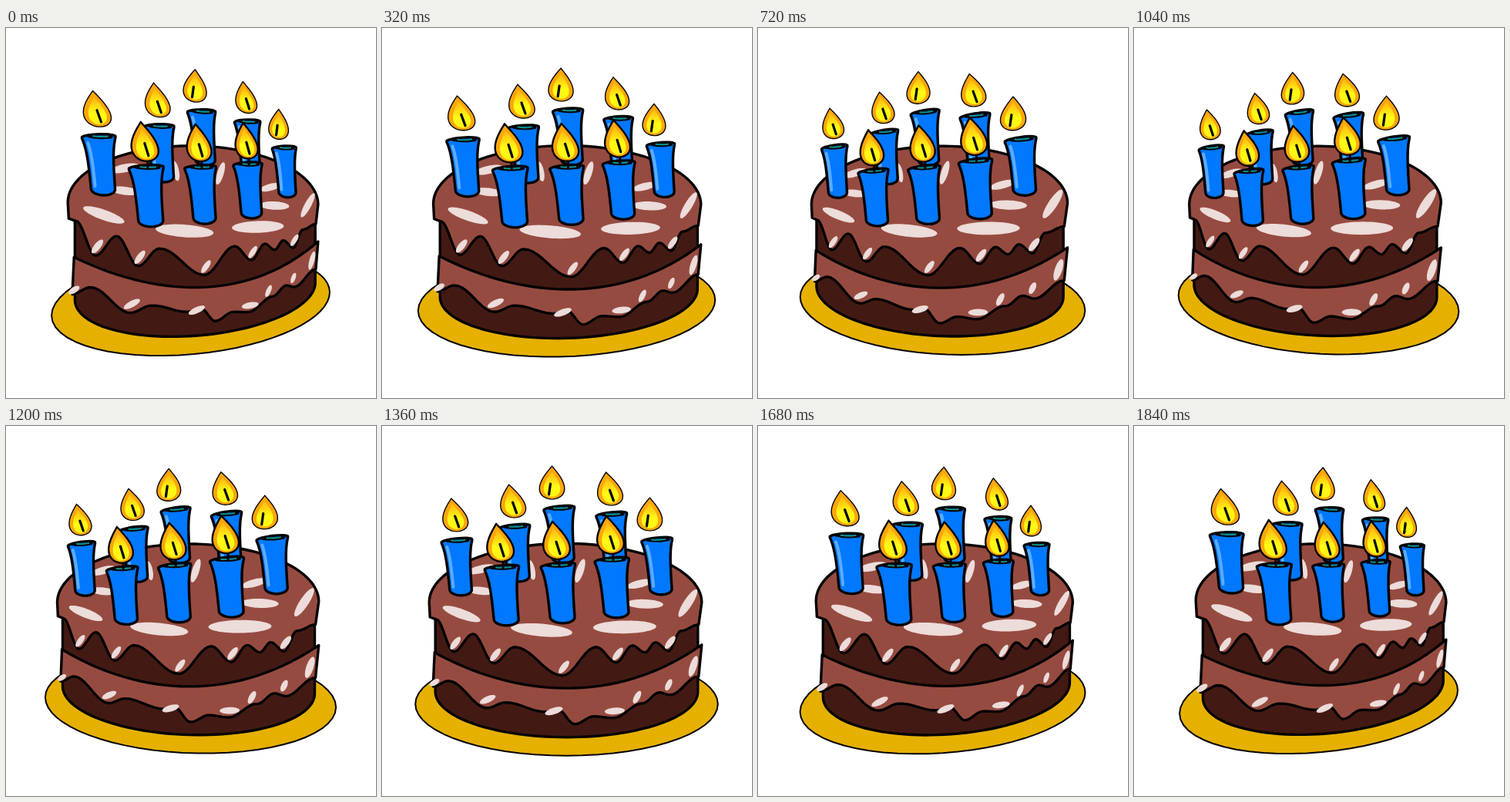
Animation, 480 px wide and 480 px high, one loop 1.92 s. Source, as an HTML page with a canvas:

```html
<!DOCTYPE html>
<html lang="en">
<head>
<meta charset="utf-8">
<title>Birthday cake</title>
<style>
html, body { margin: 0; width: 100%; height: 100%; overflow: hidden; background: #fff; }
canvas { display: block; width: 480px; height: 480px; }
</style>
</head>
<body>
<canvas id="cake" width="480" height="480"></canvas>
<script>
const ctx = document.getElementById('cake').getContext('2d');
const STEP = 80, STEPS = 24, MID = 240;
const INK = '#050202', ICING = '#964b40', SPONGE = '#431a13', SHINE = '#ecdcda';
const BLUE = '#0078ff', GLOW = '#5aacff', TEAL = '#0a9292', GOLD = '#e6b000';
const { PI, cos, sin, sqrt, exp, abs, max } = Math;

// The cake swings to and fro in perspective, kept centred on the stage.
const view = {};
function swing(now) {
  const k = Math.floor(now / STEP) % STEPS;
  const p = cos(2 * PI * (k + .5) / STEPS), m = abs(p);
  const half = 197.8 - 11 * m - 6.7 * p * p;
  view.turn = .00058 * (p + .1305);
  view.sx = half / 196.5;
  view.sy = 1.004 - .034 * m;
  view.dx = half * 196.5 * view.turn;
  view.dy = -1.5 * m;
}

function project([x, y]) {
  const q = 1 + view.turn * (x - MID);
  return [MID + (view.sx * (x - MID) + view.dx) / q, MID + (view.sy * (y - MID) + view.dy) / q];
}

// Points of f(t) for t from 0 to 1.
const sample = (f, n = 32) => Array.from({ length: n + 1 }, (_, i) => f(i / n));

const arc = (x, y, rx, ry, from = 0, to = 2 * PI) => sample(t => {
  const a = from + (to - from) * t;
  return [x + rx * cos(a), y + ry * sin(a)];
}, 60);

// Runny edge: eases between alternating tips and notches.
const runny = keys => keys.slice(1).flatMap(([x1, y1], i) => {
  const [x0, y0] = keys[i];
  return sample(t => [x0 + (x1 - x0) * t, y0 + (y1 - y0) * (1 - cos(PI * t)) / 2], 10);
});

function trace(pts) {
  ctx.beginPath();
  pts.forEach(p => ctx.lineTo(...project(p)));
}

function line(pts, color, width) {
  trace(pts);
  ctx.strokeStyle = color;
  ctx.lineWidth = width;
  ctx.stroke();
}

function blob(pts, fill, width = 3.4) {
  trace(pts);
  ctx.closePath();
  ctx.fillStyle = fill;
  ctx.fill();
  if (!width) return;
  ctx.strokeStyle = INK;
  ctx.lineWidth = width;
  ctx.stroke();
}

function shine([x, y, r, deg]) {
  const a = deg * PI / 180, thin = 2.5 + r / 7;
  blob(arc(0, 0, r, thin).map(([u, v]) =>
    [x + u * cos(a) - v * sin(a), y + u * sin(a) + v * cos(a)]), SHINE, 0);
}

const topDrips = [[70, 251], [93, 293], [118, 270], [145, 308], [172, 287], [234, 324], [278, 287],
  [304, 307], [325, 285], [341, 294], [355, 281], [372, 292], [388, 266], [411, 258]];
const lowDrips = [[66, 338], [86, 331], [136, 366], [160, 359], [212, 371], [228, 368], [250, 387],
  [275, 377], [300, 379], [338, 360], [360, 346], [374, 349], [411, 325]];
const topShines = [[103, 244, 26, 20], [207, 265, 40, 5], [315, 261, 41, -1], [341, 231, 24, 2],
  [334, 205, 17, -14], [397, 230, 21, -57], [257, 188, 16, -72], [128, 186, 18, -14],
  [128, 214, 18, 6], [194, 187, 13, 78]];
const lowShines = [[68, 333, 7, -32], [137, 355, 11, -24], [223, 370, 12, -18], [302, 370, 13, -4],
  [331, 352, 9, -62], [372, 336, 8, -65], [404, 312, 14, -72]];

function drawCake() {
  blob(arc(239.5, 361, 196.5, 67), GOLD, 2);
  blob([[69, 235], ...arc(239.5, 345, 170.5, 59, PI, 0), [410, 235]], SPONGE);

  const seam = sample(t => {
    const s = 1 - t, mix = (a, b, c, d) => a * s ** 3 + 3 * b * s * s * t + 3 * c * s * t * t + d * t ** 3;
    return [mix(68, 170, 300, 415), mix(294, 350, 365, 284)];
  });
  blob([...seam, ...runny(lowDrips).reverse()], ICING);
  lowShines.forEach(shine);

  blob([...arc(238, 229, 177, 76.5, PI, 2 * PI), ...runny(topDrips).reverse(), [62, 248]], ICING);
  topShines.forEach(shine);
  topDrips.forEach(([x, y], i) => {
    if (i && y - topDrips[i - 1][1] > 10) shine([x + 2, y - 11, 10, -52]);
  });
}

// Edge of a wax stick at depth t: side is -1 for left, 1 for right.
function waxEdge(x, y, w, h, t, side) {
  const half = .33 + .17 * exp(-4.4 * t);
  const round = sqrt(1 - max(0, (t - .9) / .1, 1 - t / .05) ** 2);
  const off = side * half * round;
  return [x + w * (.5 + .14 * t + off), y + h * (t - .06 * off * (1 - t))];
}

function drawCandle(x, y, w, h, lit) {
  const edge = side => sample(t => waxEdge(x, y, w, h, (1 - cos(PI * t)) / 2, side));
  blob([...edge(-1), ...edge(1).reverse()], BLUE);
  if (lit) {
    line(sample(t => {
      const [ex, ey] = waxEdge(x, y, w, h, .13 + .72 * t, -1);
      return [ex + 5, ey];
    }), GLOW, 4);
  }
  const rim = (from, to, dy) => sample(t => {
    const s = from + (to - from) * t;
    return [x + w * s, y + dy + 3 * sin(PI * s)];
  }, 8);
  line(rim(.22, .85, 1), INK, 4);
  line(rim(.35, .75, 0), TEAL, 2);
}

// Teardrop with its base at x, y and its tip pushed sideways by lean.
const teardrop = (x, y, w, h, lean) => sample(t => {
  const a = 2 * PI * t, rise = (1 + cos(a)) / 2;
  return [x + w * .64 * sin(a) * sin(a / 2) ** 1.15 + lean * rise ** 1.4, y - h * rise];
}, 48);

function drawFlame(x, y, w, h, tilt, outline) {
  const lean = tilt ? -7 : 0, wick = tilt ? 5 : -2;
  blob(teardrop(x, y, w, h, lean), '#fca60a', outline);
  const [, top] = project([x, y - h * .75]), [, base] = project([x, y]);
  const glow = ctx.createLinearGradient(0, top, 0, base);
  glow.addColorStop(0, '#ffc010');
  glow.addColorStop(.5, '#fffa14');
  glow.addColorStop(1, '#fff314');
  blob(teardrop(x, y - 3, w * .66, h * .76, lean * .8), glow, 0);
  line([[x - 2, y - h * .46], [x - 2 + wick, y - h * .14]], INK, 3.2);
}

// Back to front: left, top and whether the flame tilts.
const candles = [[208, 104, 0], [150, 128, 1], [276, 112, 1], [75, 146, 1],
  [335, 145, 0], [131, 181, 1], [204, 178, 1], [274, 171, 1]];

function drawLight([x, y, tilt], i) {
  const front = i > 4;
  const w = front ? 48 : 43, h = front ? 78 : 74;
  const fx = x + w / 2 - (tilt ? 0 : 9), fy = y - (front ? 5 : 9);
  drawCandle(x, y, w, h, !front);
  if (front) line([[fx + 2, fy - 6], [fx + 2, y + 4]], INK, 3);
  drawFlame(fx, fy, front ? 36 : 34, front ? 49 : 43, tilt, front ? 2.4 : 1.4);
}

function frame() {
  swing(performance.now());
  ctx.clearRect(0, 0, 480, 480);
  ctx.lineJoin = ctx.lineCap = 'round';
  drawCake();
  candles.forEach(drawLight);
  requestAnimationFrame(frame);
}

frame();
</script>
</body>
</html>
```
